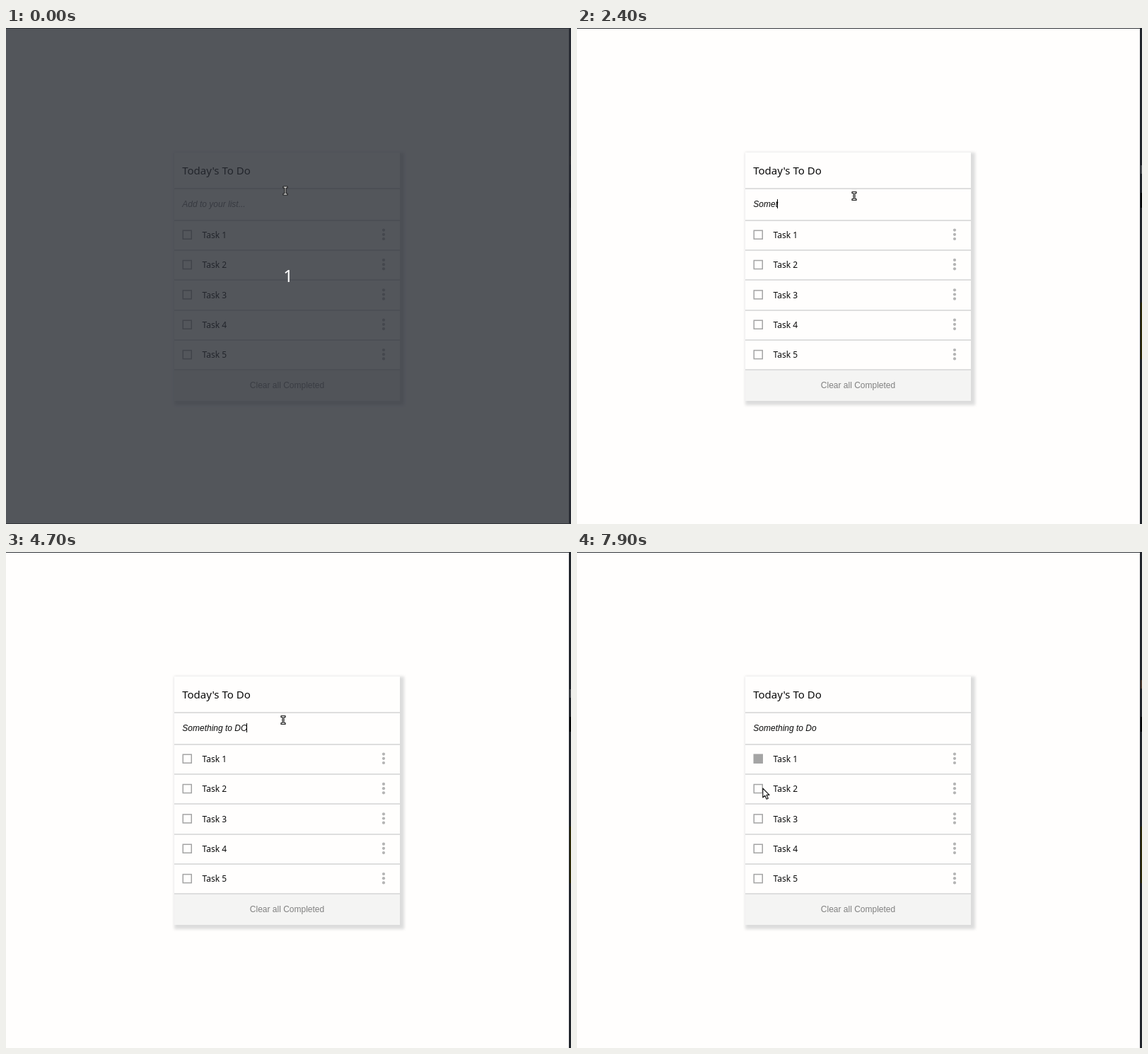
These frames come from a looping animation (799x701 px, 8 s). An HTML page:

```html
<!DOCTYPE html>
<html lang="en">
<head>
<meta charset="utf-8">
<title>To do list</title>
<style>
  html, body { margin: 0; width: 100%; height: 100%; overflow: hidden; background: #fffefd; }
  #card { position: absolute; left: 238px; top: 176px; width: 319px; height: 351px;
    background: #fffefd; box-shadow: 3px 3px 4px 3px #dcdcdc; }
  svg { position: absolute; left: 0; top: 0; }
  text { font: 12px "Noto Sans", "Open Sans", sans-serif; fill: #0a0a0a; white-space: pre; }
  #title { font-size: 15px; }
  #input, #clear { font-family: "Liberation Sans", Arial, sans-serif; }
  #input { font-style: italic; }
  #clear { fill: #808080; text-anchor: middle; }
  #count { font-size: 24px; fill: #fff; text-anchor: middle; }
  .line { fill: #dedede; }
  .box { fill: none; stroke: #a4a4a4; stroke-width: 1.5; }
  .dot { fill: #b4b4b4; }
  .cursor { fill: #fff; stroke: #1c1c1c; stroke-width: 1.2; stroke-linejoin: round; }
</style>
</head>
<body>
<div id="card"></div>
<svg width="799" height="701" viewBox="0 0 799 701">
  <rect width="797" height="1" fill="#33363b"/>
  <g id="editor">
    <rect x="796" width="3" height="701" fill="#21252b"/>
    <rect x="797" y="233" width="2" height="21" fill="#050607"/>
    <rect x="797" y="388" width="2" height="80" fill="#2d2a08"/>
    <rect id="mark" x="797" width="2" height="12"/>
  </g>
  <rect x="238" y="484" width="319" height="43" fill="#f4f4f3"/>
  <rect class="line" x="238" y="226" width="319" height="2"/>
  <text id="title" x="249.2" y="207">Today's To Do</text>
  <text id="input" x="249.3" y="253"></text>
  <rect id="caret" y="242" width="1" height="13"/>
  <g id="rows"></g>
  <text id="clear" x="397.5" y="509">Clear all Completed</text>
  <g id="veil">
    <rect width="799" height="701" fill="#282c34" opacity=".8"/>
    <rect y="700" width="797" height="1" fill="#33363b"/>
    <text id="count" x="399" y="359">1</text>
  </g>
  <g id="beam" class="cursor">
    <path d="M-3-6H3V-4H1V4H3V6H-3V4H-1V-4H-3Z"/>
  </g>
  <g id="hand" class="cursor">
    <path d="M-1 1Q0-.4 1.1 1V4.6L6 5.4Q7.6 5.8 7.3 7.5L6.5 12H.3L-3.8 8Q-4.4 6.3-2.6 6.5L-1 7.6Z"/>
    <path d="M3 5V7M5 5.3V7" fill="none" stroke-width=".8"/>
  </g>
  <g id="arrow" class="cursor">
    <path d="M0 0V13L3 10.3L5.3 15.2L7.5 14.2L5.3 9.4H9.2Z"/>
  </g>
</svg>
<script>
const $ = id => document.getElementById(id);
const LOOP = 8000, STEP = 100, PITCH = 42.35;

let rows = "";
for (let i = 0; i < 5; i++) {
  const y = PITCH * i, mid = 292.2 + y;
  rows += `<rect class="line" x="238" y="${Math.round(270.7 + y)}" width="319" height="2"/>
    <rect class="box" x="250.25" y="${mid - 6}" width="12" height="12"/>
    <text x="277.6" y="${Math.round(296.8 + y)}">Task ${i + 1}</text>`;
  for (const d of [-6.2, 0, 6.2])
    rows += `<circle class="dot" cx="534" cy="${mid - .4 + d}" r="2.1"/>`;
}
rows += `<rect class="line" x="238" y="${Math.round(270.7 + PITCH * 5)}" width="319" height="2"/>`;
$("rows").innerHTML = rows;
const firstBox = document.querySelector(".box");

// [time, text, caret shown]
const typing = [
  [0, "", 0], [500, "", 1], [1100, "", 0], [1200, "S", 1], [1800, "So", 1],
  [2100, "Some", 1], [2400, "Somet", 1], [2500, "Someth", 1], [2700, "Somethi", 1],
  [2900, "Somethin", 1], [3400, "Somethi", 1], [3600, "Somethin", 1],
  [3700, "Something", 1], [3800, "Something ", 1], [3900, "Something t", 1],
  [4100, "Something to", 1], [4300, "Something to ", 1], [4700, "Something to DO", 1],
  [5300, "Something to DO", 0], [5900, "Something to D", 1],
  [6000, "Something to Do", 1], [6500, "Something to Do", 0]
];
// [time, shape, x, y]
const pointer = [
  [0, "beam", 395, 230], [200, "beam", 392.5, 235.3], [300, "beam", 392, 237.5],
  [6800, "beam", 372, 249], [6900, "beam", 348, 264], [7100, "hand", 262, 296]
];
const at = (list, t) => list.findLast(k => k[0] <= t);
const show = (el, on) => el.setAttribute("visibility", on ? "visible" : "hidden");

function drawInput(t) {
  const [, text, caretOn] = at(typing, t), input = $("input");
  input.textContent = text || "Add to your list...";
  input.style.fill = text ? "#0a0a0a" : "#757575";
  const width = text ? input.getComputedTextLength() : 0;
  $("caret").setAttribute("x", Math.floor(249.05 + width * .998));
  show($("caret"), caretOn);
}

function drawPointer(t) {
  let [, shape, x, y] = at(pointer, t);
  if (t > 7300) {
    const k = (t - 7300) / 600;
    x += .8 * k;
    y += 38 * k * k * (3 - 2 * k);
    if (y > 299) shape = "arrow";
  }
  for (const id of ["beam", "hand", "arrow"]) show($(id), id === shape);
  $(shape).setAttribute("transform", `translate(${x} ${y})`);
}

function draw(now) {
  const t = Math.floor(now % LOOP / STEP) * STEP;
  drawInput(t);
  drawPointer(t);
  show($("veil"), t < 200);
  firstBox.style.fill = t >= 7300 ? "#a4a4a4" : "none";
  const lower = t >= 500 && t < 7600;
  $("mark").setAttribute("y", lower ? 194 : 181);
  $("mark").setAttribute("fill", lower ? "#4a4d52" : "#4a3a30");
}

const start = performance.now();
function tick() {
  draw(performance.now() - start);
  requestAnimationFrame(tick);
}
tick();
</script>
</body>
</html>
```
